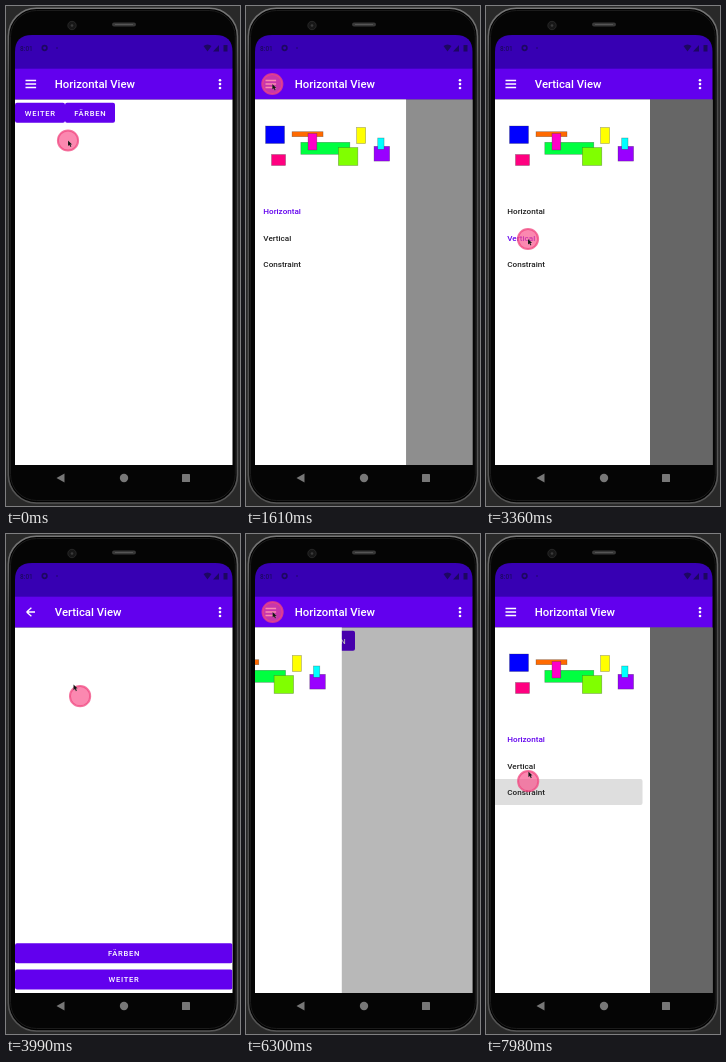
Recreate the animation shown at these times as an HTML page. Size 234 by 500 pixels, loop 8 s.

```html
<!DOCTYPE html>
<html lang="de">
<head>
<meta charset="utf-8">
<title>Navigation Drawer</title>
<style>
  html, body { margin: 0; width: 100%; height: 100%; overflow: hidden; background: #292929; }
  svg { display: block; width: 100vw; height: 100vh; }
  text { font-family: Roboto, sans-serif; font-weight: 500; }
  .btn rect { fill: #6200ee; }
  .btn text { fill: #fff; font-size: 7.6px; letter-spacing: .7px; text-anchor: middle; }
  .item { font-size: 8.1px; fill: #212121; }
  .line { stroke: #fff; stroke-width: 1.3; fill: none; }
</style>
</head>
<body>
<svg viewBox="0 0 234 500" preserveAspectRatio="none">
  <defs>
    <clipPath id="screen"><path d="M9 459V46Q9 29 26 29H209.5Q226.5 29 226.5 46V459Z"/></clipPath>
    <clipPath id="body"><rect x="9" y="93.6" width="217.5" height="365.4"/></clipPath>
    <linearGradient id="rim" x2="0" y2="1">
      <stop offset="0" stop-color="#777"/>
      <stop offset=".15" stop-color="#4a4a4a"/>
      <stop offset="1" stop-color="#555"/>
    </linearGradient>
  </defs>

  <rect width="234" height="500" fill="#292929"/>
  <rect x="2.4" y="2.2" width="229" height="494.8" rx="28" fill="#000" stroke="url(#rim)" stroke-width="1.6"/>
  <rect x="4.5" y="4.5" width="224.8" height="490" rx="26" fill="#050505" stroke="#222" stroke-width=".8"/>
  <circle cx="66" cy="19.5" r="4.2" fill="#171717" stroke="#2c2c2c" stroke-width=".8"/>
  <circle cx="66" cy="19.5" r="1.3" fill="#3a3a3a"/>
  <rect x="106" y="16.5" width="24" height="4" rx="2" fill="#383838"/>
  <rect x="109" y="18" width="18" height="1" fill="#555"/>

  <g clip-path="url(#screen)">
    <rect x="9" y="29" width="218" height="34" fill="#3700b3"/>
    <g fill="#1d0762">
      <text x="14" y="45" font-size="6.5">8:01</text>
      <circle cx="38.6" cy="42" r="2.3" fill="none" stroke="#1d0762" stroke-width="1.7"/>
      <circle cx="51" cy="42" r=".8"/>
      <path d="M197.5 40Q201.5 37 205.5 40L201.5 45.5ZM207 45.5L213 39V45.5ZM217.5 39H221.5V45.5H217.5Z"/>
    </g>
    <rect x="9" y="62.7" width="218" height="31" fill="#6200ee"/>
    <rect x="9" y="93.6" width="218" height="365.4" fill="#fff"/>
  </g>

  <g clip-path="url(#body)">
    <g id="horizontal"></g>
    <g id="vertical"></g>
    <rect id="scrim" x="9" y="93" width="218" height="366"/>
    <g id="drawer">
      <rect x="9" y="93" width="155" height="366" fill="#fff"/>
      <rect id="hover" x="5" y="245" width="151.5" height="26" rx="2" fill="#dedede"/>
      <g id="shapes" stroke="#333" stroke-opacity=".45" stroke-width=".6"></g>
      <g id="items"></g>
    </g>
  </g>

  <text id="title" x="48.8" y="82.3" font-size="11.35" fill="#fff"></text>
  <path id="icon" class="line"/>
  <g fill="#fff">
    <circle cx="214" cy="74.2" r="1.3"/>
    <circle cx="214" cy="78.1" r="1.3"/>
    <circle cx="214" cy="82" r="1.3"/>
  </g>

  <g fill="#777">
    <path d="M50.5 472L58.5 467.5V476.5Z"/>
    <circle cx="118" cy="472" r="4.2"/>
    <rect x="176" y="468" width="8" height="8" rx=".6"/>
  </g>

  <circle id="touch" r="10.1" fill="#f94f8a" fill-opacity=".68" stroke="#f0457f" stroke-opacity=".75" stroke-width="2"/>
  <path id="cursor" d="M0 0V5.6L1.4 4.4L2.4 6.6L3.4 6.1L2.5 4H4.2Z" fill="#111" stroke="#fff" stroke-opacity=".35" stroke-width=".3"/>
</svg>

<script>
const LOOP = 8000;
const $ = id => document.getElementById(id);
const clamp = v => Math.min(1, Math.max(0, v));
const mix = (a, b, k) => a + (b - a) * k;
const smooth = k => k * k * (3 - 2 * k);
const span = (t, from, length) => clamp((t - from) / length);
const settle = k => 1 - (1 - k) ** 5;

function add(parent, name, attrs, text) {
  const el = document.createElementNS('http://www.w3.org/2000/svg', name);
  for (const key in attrs) el.setAttribute(key, attrs[key]);
  if (text) el.textContent = text;
  return parent.appendChild(el);
}

function button(parent, label, x, y, width) {
  const g = add(parent, 'g', { class: 'btn' });
  add(g, 'rect', { x, y, width, height: 20, rx: 2 });
  add(g, 'text', { x: x + width / 2 + .3, y: y + 12.8 }, label);
}

button($('horizontal'), 'WEITER', 9, 96.8, 50);
button($('horizontal'), 'FÄRBEN', 59, 96.8, 50);
button($('vertical'), 'FÄRBEN', 9, 409.2, 217.5);
button($('vertical'), 'WEITER', 9, 435.6, 217.5);

// x, y, width, height, colour
[
  [23.5, 120, 19, 17.5, '#00f'],
  [29.5, 148.5, 14, 11, '#ff0080'],
  [50, 125.7, 31, 5, '#ff6a00'],
  [58.8, 136.3, 49, 12, '#00ff40'],
  [66, 127.5, 8.8, 16.5, '#ff00c8'],
  [96.3, 141.5, 19.5, 18, '#80ff00'],
  [114.6, 121.5, 9, 16, '#ff0'],
  [132, 140.3, 15.6, 14.8, '#90f'],
  [135.7, 132, 6.3, 11.3, '#00ffff']
].forEach(([x, y, width, height, fill]) => add($('shapes'), 'rect', { x, y, width, height, fill }));

const items = ['Horizontal', 'Vertical', 'Constraint'].map((label, i) =>
  add($('items'), 'text', { class: 'item', x: 21.3, y: 208 + i * 26.5 }, label));

// time, x, y
const pointerPath = [
  [0, 62, 134.5], [250, 62, 134.5], [950, 26.3, 78], [1800, 26.3, 78], [2550, 42, 233],
  [3380, 42, 233], [3700, 92, 194], [4400, 26.6, 78], [6750, 26.6, 78],
  [7500, 42, 258], [7840, 42, 258], [8060, 42.5, 229]
];

function pointer(t) {
  const i = Math.max(1, pointerPath.findIndex(p => p[0] > t));
  const [a, b] = [pointerPath[i - 1], pointerPath[i]];
  const k = smooth(span(t, a[0], b[0] - a[0]));
  return [mix(a[1], b[1], k), mix(a[2], b[2], k)];
}

function drawerAt(t) {
  if (t < 3390) return settle(span(t, 1350, 502));
  if (t < 6000) return 1 - settle(span(t, 3390, 480));
  return settle(span(t, 6225, 502));
}

// The dimming trails behind the sliding drawer.
function dimAt(p) {
  if (p < .56) return p / 2;
  if (p < .974) return mix(.28, .44, (p - .56) / .414);
  return mix(.44, .6, (p - .974) / .026);
}

function drawIcon(k) {
  const wing = mix(5.3, .6, k), tip = mix(5.3, 4.2, k), end = mix(3.5, 4.2, k), root = mix(3.5, 0, k);
  const bar = s => `M${-tip} ${s * root}L${wing} ${s * end}`;
  const half = mix(5.3, 4.2, k);
  $('icon').setAttribute('d', bar(-1) + `M${-half} 0H${half}` + bar(1));
  $('icon').setAttribute('transform', `translate(24.8 78) rotate(${180 * k - (k > 0 ? 180 : 0)})`);
}

function place(id, [x, y]) {
  $(id).setAttribute('transform', `translate(${x} ${y})`);
}

function render(t) {
  const isVertical = t >= 3290 && t < 5350;
  const fade = span(t, 3380, 200) - span(t, 5400, 200);
  const open = drawerAt(t);

  $('title').textContent = isVertical ? 'Vertical View' : 'Horizontal View';
  items.forEach((el, i) => el.style.fill = i === +isVertical ? '#6200ee' : '#212121');
  $('vertical').setAttribute('opacity', fade);
  $('horizontal').setAttribute('opacity', 1 - fade);

  place('drawer', [-155 * (1 - open), 0]);
  $('scrim').setAttribute('opacity', dimAt(open));
  $('hover').setAttribute('opacity', t >= 7560 ? 1 : 0);

  drawIcon(smooth(span(t, 3380, 300)) - smooth(span(t, 5400, 300)));
  place('touch', pointer(Math.max(0, t - 50)));
  place('cursor', pointer(t));
}

function tick() {
  render(performance.now() % LOOP);
  requestAnimationFrame(tick);
}
tick();
</script>
</body>
</html>
```
